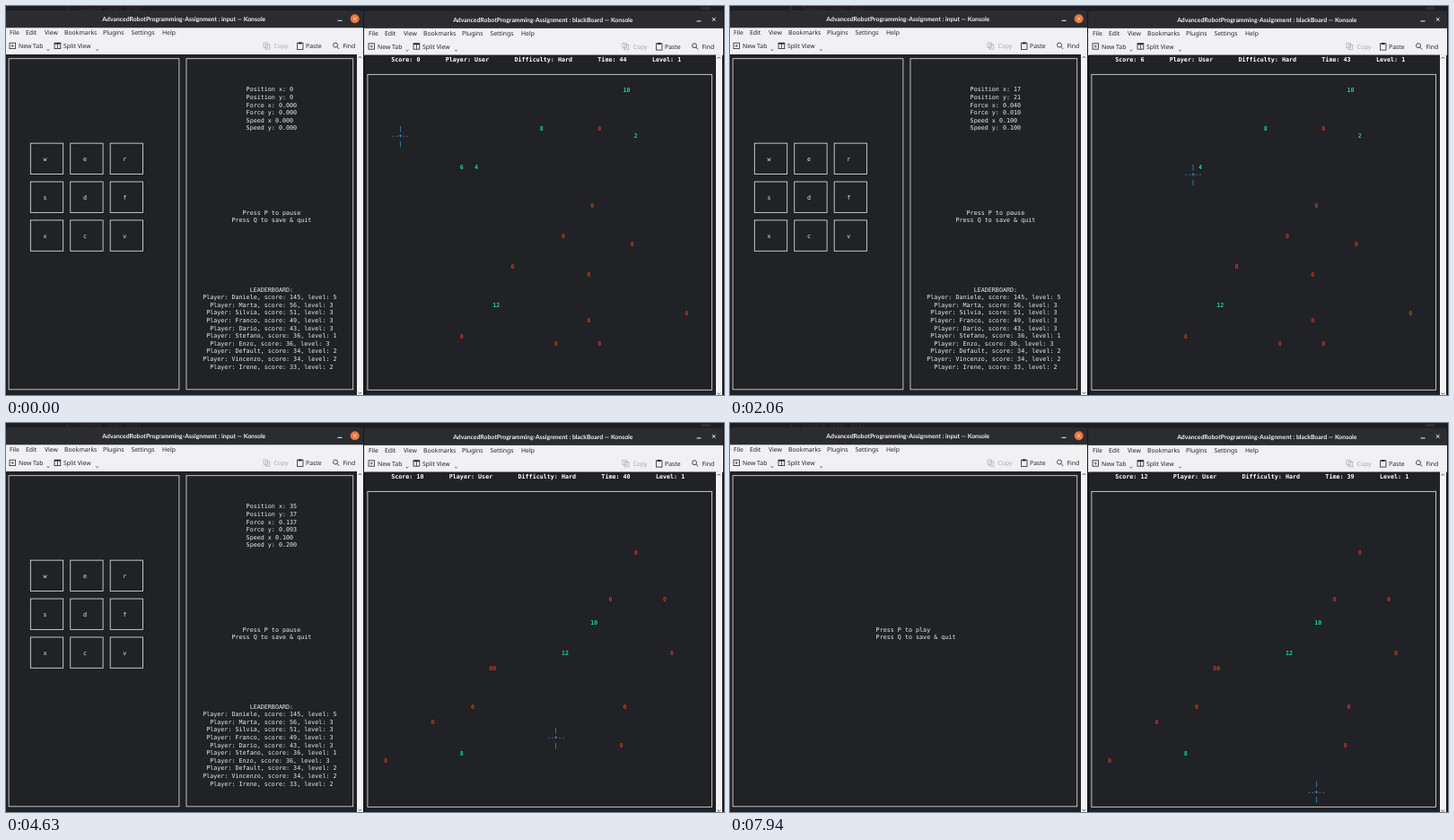
These frames come from a looping animation (800x434 px, 8 s). An HTML page with a canvas:

```html
<!DOCTYPE html>
<html lang="en">
<head>
<meta charset="utf-8">
<title>Robot game</title>
<style>
html, body { margin: 0; width: 100%; height: 100%; overflow: hidden; background: #15161a; }
canvas { display: block; width: 800px; height: 434px; }
</style>
</head>
<body>
<canvas id="stage"></canvas>
<script>
const W = 800, H = 434, LOOP = 8000;
const CW = 4.038, CH = 8.585;
const SANS = '"Noto Sans", "Open Sans", sans-serif';
const MONO = '6.7px "DejaVu Sans Mono", monospace';
const GREEN = '#1cd09a', RED = '#c0392b', BLUE = '#45b5f7';
const INK = '#232629', PAPER = '#f1f0f2', TERM = '#202225', FG = '#ededed';

const canvas = document.getElementById('stage');
const ctx = canvas.getContext('2d');
const dpr = window.devicePixelRatio || 1;
canvas.width = W * dpr;
canvas.height = H * dpr;

// Crosshair path: time, column, row
const path = [
  [0, 9, 10], [800, 15, 10.6], [1380, 20, 12], [1890, 26, 14.2], [2560, 34, 18],
  [3750, 45, 27], [5440, 59, 40], [5900, 62, 41]
];

// Telemetry: time, then position, force and speed pairs
const readings = [
  [0, '0', '0', '0.000', '0.000', '0.000', '0.000'],
  [900, '17', '21', '0.040', '0.010', '0.100', '0.100'],
  [2440, '35', '37', '0.137', '0.093', '0.100', '0.200'],
  [5900, '65', '95', '0.262', '0.349', '0.000', '-0.329']
];
const scores = [[0, 0], [1890, 6], [2220, 10], [4900, 12]];
const clock = [[0, 44], [1000, 43], [2200, 42], [3400, 41], [4600, 40], [5800, 39]];
const RESPAWN = 4500, PAUSE = 7000;

// Targets: value, column, row, time collected
const boards = [
  {
    targets: [[10, 71, 4], [8, 48, 9], [2, 74, 10], [6, 26, 14, 1890], [4, 30, 14, 2220], [12, 35, 32]],
    mines: [[64, 9], [62, 19], [54, 23], [73, 24], [40, 27], [61, 28], [88, 33], [61, 34], [26, 36], [52, 37], [64, 37]]
  },
  {
    targets: [[10, 62, 19], [12, 54, 23], [8, 26, 36]],
    mines: [[74, 10], [67, 16], [82, 16], [84, 23], [34, 25], [35, 25], [29, 30], [71, 30], [18, 32], [70, 35], [5, 37]]
  }
];

const leaders = [
  ['Daniele', 145, 5], ['Marta', 56, 3], ['Silvia', 51, 3], ['Franco', 49, 3], ['Dario', 43, 3],
  ['Stefano', 36, 1], ['Enzo', 36, 3], ['Default', 34, 2], ['Vincenzo', 34, 2], ['Irene', 33, 2]
];

const latest = (list, t) => list.filter(e => e[0] <= t).pop();

function crossAt(t) {
  const i = path.findIndex(p => p[0] > t);
  if (i < 0) return path[path.length - 1].slice(1);
  const a = path[i - 1], b = path[i], k = (t - a[0]) / (b[0] - a[0]);
  return [1, 2].map(n => Math.round(a[n] + (b[n] - a[n]) * k));
}

function rect(x, y, w, h, color) {
  ctx.fillStyle = color;
  ctx.fillRect(x, y, w, h);
}

function stroke(points, color, width = 0.8) {
  ctx.strokeStyle = color;
  ctx.lineWidth = width;
  ctx.beginPath();
  points.forEach(([x, y], i) => i ? ctx.lineTo(x, y) : ctx.moveTo(x, y));
  ctx.stroke();
}

function label(s, x, y, color = INK, font = '6.85px ' + SANS, align = 'left') {
  ctx.font = font;
  ctx.fillStyle = color;
  ctx.textAlign = align;
  ctx.fillText(s, x, y);
}

// A terminal is addressed by character cell
function terminal(x0, y0) {
  const cx = c => x0 + c * CW, cy = r => y0 + r * CH;
  return {
    print(s, c, r, color = FG, bold = false) {
      ctx.font = (bold ? 'bold ' : '') + MONO;
      ctx.fillStyle = color;
      ctx.textAlign = 'center';
      [...String(s)].forEach((ch, i) => ctx.fillText(ch, cx(c + i), cy(r) + 2.4));
    },
    box(c1, r1, c2, r2) {
      ctx.strokeStyle = '#dededf';
      ctx.lineWidth = 0.85;
      ctx.strokeRect(cx(c1), cy(r1), (c2 - c1) * CW, (r2 - r1) * CH);
    }
  };
}

const left = terminal(3.1, 58.7), right = terminal(402.9, 59.2);

function toolbar() {
  const grey = '#a9abad';
  const menu = { File: 4, Edit: 22, View: 43, Bookmarks: 65, Plugins: 108, Settings: 139.5, Help: 174 };
  for (const name in menu) label(name, menu[name], 32);

  ctx.lineWidth = 0.8;
  ctx.strokeStyle = INK;
  ctx.strokeRect(4, 41.2, 6.4, 6.4);
  stroke([[7.2, 42.8], [7.2, 46]], INK, 0.6);
  stroke([[5.6, 44.4], [8.8, 44.4]], INK, 0.6);
  label('New Tab', 14, 47);

  ctx.lineWidth = 0.8;
  ctx.strokeRect(54, 41.2, 6.8, 6.4);
  stroke([[57.4, 41.2], [57.4, 47.6]], INK);
  rect(54, 41, 6.8, 1.6, INK);
  label('Split View', 64, 47);

  for (const x of [47, 101.5])
    stroke([[x - 1.4, 48.4], [x, 49.7], [x + 1.4, 48.4]], INK, 0.7);

  ctx.strokeStyle = grey;
  ctx.strokeRect(287, 41, 4.6, 5.2);
  ctx.strokeRect(289.2, 43, 4.6, 5.2);
  label('Copy', 298.5, 47, grey);

  ctx.lineWidth = 0.8;
  ctx.strokeStyle = INK;
  ctx.strokeRect(324.4, 41.3, 6.6, 7.2);
  rect(325.8, 40.4, 3.8, 2, INK);
  label('Paste', 334, 47);

  ctx.beginPath();
  ctx.arc(367, 43.6, 2.5, 0, Math.PI * 2);
  ctx.stroke();
  stroke([[368.8, 45.4], [371.2, 48]], INK);
  label('Find', 375.5, 47);
}

// Window chrome, with x and y as the offset from the stage corner
function frame(x, y, bar, title, active) {
  ctx.save();
  ctx.translate(x, y);
  const [x1, x2] = bar, mid = 14.3, light = '#f4f4f4';
  ctx.fillStyle = '#2b2c30';
  ctx.beginPath();
  ctx.roundRect(x1, 5, x2 - x1, 24, [3, 3, 0, 0]);
  ctx.fill();
  label('AdvancedRobotProgramming-Assignment : ' + title + ' — Konsole', 198.3, mid + 2.6,
    light, 'bold 6.85px Lato, sans-serif', 'center');
  stroke([[369.5, mid + 2], [374.5, mid + 2]], light, 1);
  if (active) {
    ctx.fillStyle = '#e9743c';
    ctx.beginPath();
    ctx.arc(388.7, mid, 5, 0, Math.PI * 2);
    ctx.fill();
  }
  const cx = 388.7, d = 1.8, ink = active ? '#fbe3d6' : light;
  stroke([[cx - d, mid - d], [cx + d, mid + d]], ink, 1);
  stroke([[cx - d, mid + d], [cx + d, mid - d]], ink, 1);

  rect(x1, 24.3, x2 - x1, 30, PAPER);
  toolbar();
  rect(0, 54, 391, H - 54, TERM);
  rect(391, 54, 7, H - 54, '#f3f3f4');
  stroke([[392.6, 58], [394.3, 56.3], [396, 58]], INK);
  stroke([[392.6, 431], [394.3, 432.7], [396, 431]], INK);
  ctx.restore();
}

function drawInput(t) {
  if (t >= PAUSE) {
    left.box(0, 0, 95, 43);
    left.print('Press P to play', 40, 20);
    left.print('Press Q to save & quit', 40, 21);
    return;
  }
  left.box(0, 0, 47, 43);
  left.box(49, 0, 95, 43);
  [...'wersdfxcv'].forEach((key, i) => {
    const c = 6 + (i % 3) * 11, r = 11 + Math.floor(i / 3) * 5;
    left.box(c, r, c + 9, r + 4);
    left.print(key, c + 4, r + 2);
  });

  const center = (s, r) => left.print(s, Math.floor(73 - s.length / 2), r);
  const values = latest(readings, t);
  ['Position x: ', 'Position y: ', 'Force x: ', 'Force y: ', 'Speed x ', 'Speed y: ']
    .forEach((name, i) => center(name + values[i + 1], 4 + i));
  center('Press P to pause', 20);
  center('Press Q to save & quit', 21);
  center('LEADERBOARD:', 30);
  leaders.forEach(([name, score, level], i) =>
    center(`Player: ${name}, score: ${score}, level: ${level}`, 31 + i));
}

function drawBoard(t) {
  const status = ['Score: ' + latest(scores, t)[1], 'Player: User', 'Difficulty: Hard',
    'Time: ' + latest(clock, t)[1], 'Level: 1'];
  right.print(status.join(' '.repeat(7)), 7, 0, '#ffffff', true);
  right.box(0, 2, 95, 43);

  const { targets, mines } = boards[t < RESPAWN ? 0 : 1];
  for (const [c, r] of mines) right.print('0', c, r, RED, true);
  for (const [value, c, r, taken = Infinity] of targets)
    if (t < taken) right.print(value, c, r, GREEN, true);

  const [c, r] = crossAt(t);
  right.print('|', c, r - 1, BLUE);
  right.print('--+--', c - 2, r, BLUE);
  right.print('|', c, r + 1, BLUE);
}

function draw(t) {
  ctx.setTransform(dpr, 0, 0, dpr, 0, 0);
  ctx.textBaseline = 'alphabetic';
  ctx.textRendering = 'geometricPrecision';
  rect(0, 0, W, H, '#15161a');
  rect(0, 0, W, 8, '#1d1e23');
  label('4.  Simple level dial', 66, 4.6, '#43282c', MONO);
  rect(775, 1, 10, 3, '#2c2e33');
  frame(0, 0, [0, 398], 'input', true);
  frame(400, 0.6, [-1, 399], 'blackBoard', false);
  drawInput(t);
  drawBoard(t);
}

const start = performance.now();
function tick() {
  draw((performance.now() - start) % LOOP);
  requestAnimationFrame(tick);
}
tick();
</script>
</body>
</html>
```
